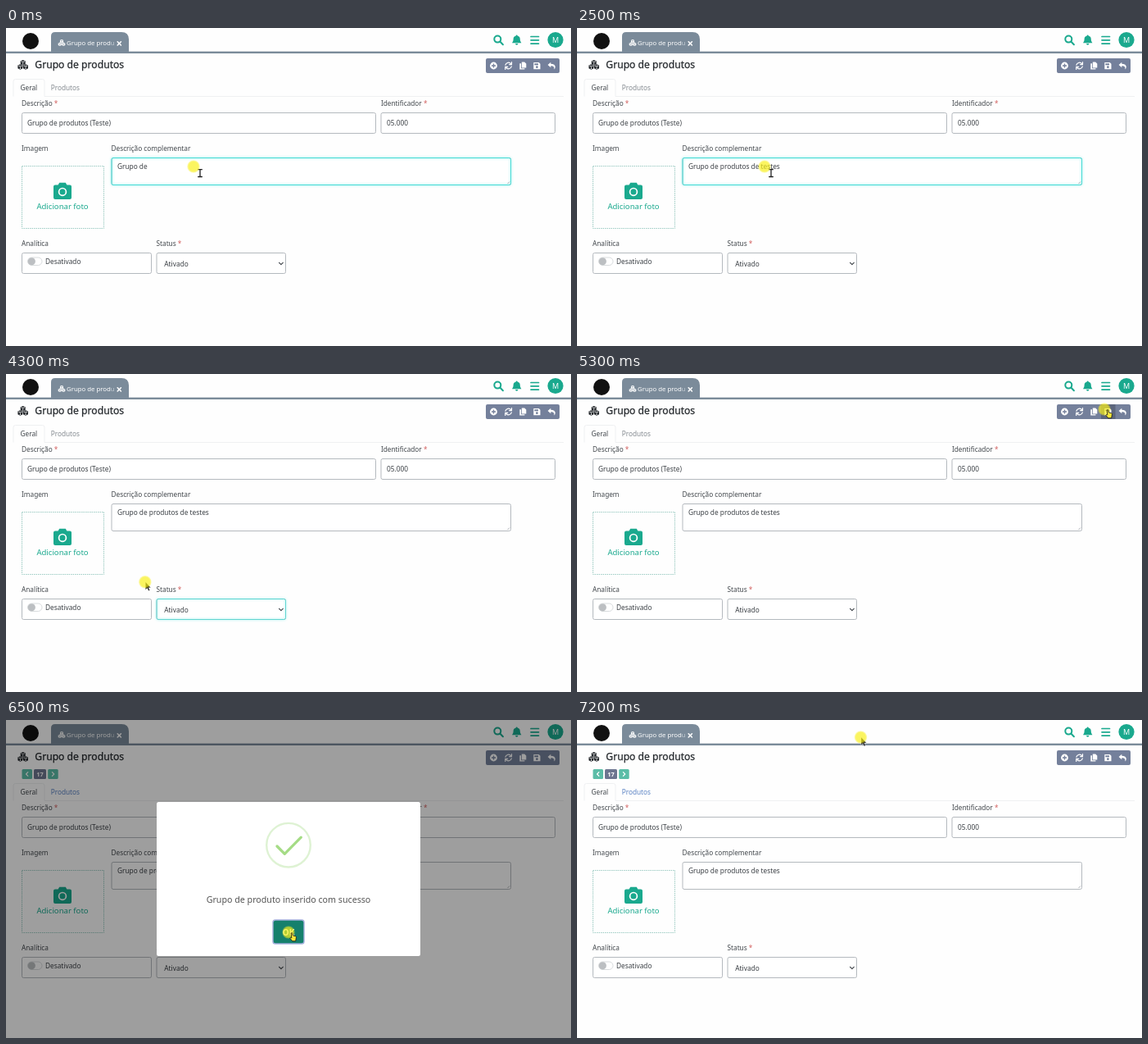
An HTML page for the animation above (7.3 s loop, 690 by 388 pixels).

```html
<!DOCTYPE html>
<html lang="pt">
<head>
<meta charset="utf-8">
<title>Grupo de produtos</title>
<style>
  html, body { margin: 0; width: 100%; height: 100%; overflow: hidden; background: #fefefe; }
  svg { display: block; width: 690px; height: 388px; font: 8.25px "Noto Sans", "Open Sans", sans-serif; }
  text { fill: #43484d; white-space: pre; }
  .value { fill: #3c4146; font-size: 8.3px; }
  .star { fill: #d2605f; }
  .box { fill: #fff; stroke: #b4b9be; }
  .focus { fill: none; stroke: #4fdcd6; filter: drop-shadow(0 0 1.5px #5fe8e2); }
  .green { fill: #1aa98e; }
  .white { fill: #fff; }
  .line { fill: none; stroke: currentColor; stroke-linecap: round; stroke-linejoin: round; }
  .bold { font-weight: 700; text-anchor: middle; fill: #fff; }
  .heading { font-size: 12.15px; fill: #25292d; stroke: #25292d; stroke-width: .25; }
</style>
</head>
<body>
<svg viewBox="0 0 690 388">
  <defs>
    <g id="cube">
      <path d="M0-3.3 3-2V1.7L0 3.2-3 1.7V-2Z" fill="currentColor"/>
      <path d="M-2.1-1.6 0-.7 2.1-1.6M0 .3V2.4" fill="none" stroke="var(--cut)" stroke-width=".9"/>
    </g>
    <g id="cubes">
      <use href="#cube" y="-2.6"/><use href="#cube" x="-3.3" y="2.7"/><use href="#cube" x="3.3" y="2.7"/>
    </g>
    <radialGradient id="spot">
      <stop offset=".75" stop-color="#f9f01c" stop-opacity=".7"/>
      <stop offset="1" stop-color="#f9f01c" stop-opacity=".25"/>
    </radialGradient>
  </defs>

  <!-- Header -->
  <circle cx="30" cy="16" r="10" fill="#111"/>
  <path d="M55 30V10Q55 5 60 5H141Q150 5 150 14V30Z" fill="#7b8b9a"/>
  <rect y="28.6" width="690" height="2.4" fill="#7b8b9a"/>
  <use href="#cubes" transform="translate(68 18) scale(.68)" style="color:#fff;--cut:#7b8b9a"/>
  <text x="74" y="20.8" font-size="7.8" class="white">Grupo de prod<tspan opacity=".55">u</tspan></text>
  <path class="line" d="m136.2 16.8 4.2 4.2m0-4.2-4.2 4.2" color="#fff" stroke-width="1.6"/>
  <g class="line" color="#1aa98e" stroke-width="2">
    <circle cx="600.3" cy="13.6" r="4"/><path d="m603.5 16.8 3.4 3.4"/>
    <path d="M641 10.5h9.5M641 14.8h9.5M641 19.1h9.5" stroke-width="1.7"/>
  </g>
  <path class="green" d="M623.7 8.4Q624.7 8.4 624.7 9.6C627 10.2 627.8 11.8 627.8 14Q627.8 16.6 629.4 18.2H618Q619.6 16.6 619.6 14C619.6 11.8 620.4 10.2 622.7 9.6Q622.7 8.4 623.7 8.4ZM622 19H625.4Q625.2 20.7 623.7 20.7T622 19Z"/>
  <circle class="green" cx="671" cy="14.5" r="9.6"/>
  <text x="671" y="17.9" font-size="9" text-anchor="middle" class="white">M</text>

  <!-- Page -->
  <g id="page">
    <use href="#cubes" transform="translate(20.7 44.9)" style="color:#25292d;--cut:#fff"/>
    <text x="35.3" y="49.4" class="heading">Grupo de produtos</text>
    <g id="pager">
      <rect x="19.5" y="60" width="12.5" height="12" rx="1.5" fill="#5bbda7"/>
      <rect x="34" y="60" width="15" height="12" rx="1.5" fill="#6d7590"/>
      <rect x="51.2" y="60" width="12.5" height="12" rx="1.5" fill="#5bbda7"/>
      <path class="line" d="m26.8 63.7-2.3 2.3 2.3 2.3M56.4 63.7l2.3 2.3-2.3 2.3" color="#fff" stroke-width="1.2"/>
      <text x="41.5" y="68.7" font-size="7.3" class="bold">17</text>
    </g>
    <g id="form">
      <path d="M9 83.5V65Q9 62.5 11.5 62.5H44.5Q47 62.5 47 65V83.5H681" fill="none" stroke="#eff0f2"/>
      <text x="17.5" y="76">Geral</text>
      <text x="54.7" y="76" id="products">Produtos</text>

      <text x="19" y="94.8">Descrição <tspan class="star">*</tspan></text>
      <rect class="box" x="19.5" y="103.5" width="432" height="25" rx="2"/>
      <text x="26" y="119" class="value">Grupo de produtos (Teste)</text>
      <text x="458" y="94.8">Identificador <tspan class="star">*</tspan></text>
      <rect class="box" x="458" y="103.5" width="212.5" height="25" rx="2"/>
      <text x="465" y="119" class="value">05.000</text>

      <text x="19" y="149.8">Imagem</text>
      <rect x="19.5" y="168.5" width="100" height="76" fill="none" stroke="#86bfb5" stroke-width=".8" stroke-dasharray="1.5 1"/>
      <path class="green" d="M60 191.5H63.6L65.2 188.8H72.8L74.4 191.5H78Q80 191.5 80 193.5V207Q80 209 78 209H60Q58 209 58 207V193.5Q58 191.5 60 191.5Z"/>
      <circle cx="69" cy="199.9" r="4.4" fill="none" stroke="#fff" stroke-width="1.7"/>
      <text x="69" y="221" font-size="9.55" text-anchor="middle" class="green">Adicionar foto</text>

      <text x="128.5" y="149.8">Descrição complementar</text>
      <rect class="box" x="129" y="158.5" width="487.5" height="33" rx="2"/>
      <rect class="focus" id="areaFocus" x="129" y="158.5" width="487.5" height="33" rx="2"/>
      <path d="m612.5 190 2.5-2.5" stroke="#8a8f95" stroke-width=".7"/>
      <text x="136" y="171.8" class="value" id="typed"></text>
      <rect id="caret" y="163" width=".9" height="11" fill="#222"/>

      <text x="19" y="266">Analítica</text>
      <rect class="box" x="19.5" y="274.5" width="158" height="25" rx="2"/>
      <rect x="26.5" y="280" width="17.5" height="9.5" rx="4.75" fill="#fff" stroke="#cfd2d5" stroke-width=".8"/>
      <circle cx="31.3" cy="284.8" r="4.6" fill="#bcbfc2"/>
      <text x="48" y="288" class="value">Desativado</text>
      <text x="183.5" y="266">Status <tspan class="star">*</tspan></text>
      <rect class="box" x="184" y="274.5" width="157.5" height="25" rx="2"/>
      <rect class="focus" id="selectFocus" x="184" y="274.5" width="157.5" height="25" rx="2"/>
      <text x="193.3" y="290.6" class="value">Ativado</text>
      <path class="line" d="m333.6 286.3 2.3 2.4 2.3-2.4" color="#43484d" stroke-width="1.2"/>
    </g>
    <g id="toolbar">
      <rect x="586" y="37" width="90" height="18" rx="2" fill="#74809b"/>
      <rect id="saveHover" x="640" y="37" width="17.5" height="18" fill="#5c667d"/>
      <circle class="white" cx="595.5" cy="46" r="4.4"/>
      <path d="M593 46h5M595.5 43.5v5" stroke="#74809b" stroke-width="1.3"/>
      <path class="line" d="M609.9 45.2A3.8 3.8 0 0 1 616.7 43.8M617.3 46.8A3.8 3.8 0 0 1 610.5 48.2M617.5 41.6V44.6H614.6M609.7 50.4V47.4H612.6" color="#fff" stroke-width="1.2"/>
      <path class="white" d="M629.8 41.5H633.2L635.3 43.6V48.5H629.8ZM627.3 43.3H629V49.3H633.4V50.6H627.3Z"/>
      <path class="white" fill-rule="evenodd" d="M644.3 42H650.7L652.5 43.8V50.2H644.3ZM645.4 43.2V45.2H650V43.2ZM648.4 46.3A1.4 1.4 0 1 0 648.4 49.1 1.4 1.4 0 1 0 648.4 46.3Z"/>
      <path class="white" d="M661.6 45 665.3 41.8V43.7C669 43.7 670.8 45.3 670.8 47.6Q670.8 49.4 669.3 50.5C669.9 47.6 668.6 46.4 665.3 46.3V48.3Z"/>
    </g>
  </g>

  <g id="dropdown">
    <rect x="184" y="300" width="157.5" height="25" fill="#fff" style="filter:drop-shadow(0 4px 6px #0004)"/>
    <rect x="184" y="312.4" width="157.5" height="12.4" fill="#1a63c5"/>
    <text x="193.3" y="309.8" class="value">Desativado</text>
    <text x="193.3" y="321.9" class="value" style="fill:#fff">Ativado</text>
  </g>

  <rect id="backdrop" width="690" height="388"/>
  <g id="dialog">
    <rect x="184" y="100" width="322" height="188" rx="2.5" fill="#fff"/>
    <circle cx="345" cy="152.7" r="26.8" fill="none" stroke="#a5dc86" stroke-opacity=".36" stroke-width="2.4"/>
    <path id="tick" class="line" d="m331 154 9.3 9.3L360.3 143.2" color="#a5dc86" stroke-width="3.3" pathLength="1" stroke-dasharray="1 2"/>
    <text x="345" y="222.8" font-size="10.68" text-anchor="middle" style="fill:#545454">Grupo de produto inserido com sucesso</text>
    <rect id="okRing" x="325.3" y="243.3" width="39.4" height="30.4" rx="3.5" fill="#a3aedb"/>
    <rect id="okButton" x="326.7" y="244.7" width="36.6" height="27.6" rx="2.5"/>
    <text x="345" y="262.5" font-size="9.9" class="bold">OK</text>
  </g>

  <g id="statusBar">
    <rect y="380" width="229.5" height="8" fill="#1d1f21"/>
    <text x="1.5" y="385.7" font-size="3.7" class="white">Aguardando dev.gestao.plus...</text>
  </g>

  <g id="pointer">
    <path id="beam" class="line" d="M5.7 3.7H10.3M8 3.7V12.5M5.7 12.5H10.3" color="#222" stroke-width="1.3"/>
    <path id="arrow" d="M.5 0V9.6L2.7 7.6 4.2 10.9 5.8 10.2 4.3 7H7Z" fill="#111" stroke="#fff" stroke-width=".4"/>
    <circle r="7.8" fill="url(#spot)"/>
    <path id="hand" d="M3.2 1Q4.6 0 5 1.5L5.5 4 8.6 4.8Q9.6 5.2 9.4 6.6L8.7 10.8H4.8L1.9 7.5Q1.6 6.2 3.8 6.8Z" fill="#f6e83a" stroke="#111" stroke-width=".8"/>
  </g>
</svg>
<script>
  const LOOP = 7300, STEP = 100;
  const TYPED = 'produtos de testes';
  const PATH = [
    [0, 229, 169], [2900, 229, 169], [3200, 285, 287], [3900, 285, 287],
    [4200, 140, 262], [4500, 255, 230], [5100, 644, 43], [5500, 644, 43],
    [5900, 441.5, 173.5], [6200, 345, 259], [6600, 345, 259],
    [6900, 342, 6], [7100, 346.5, 21], [LOOP, 346.5, 21]
  ];

  const el = id => document.getElementById(id);
  const show = (id, visible) => el(id).style.display = visible ? '' : 'none';
  const set = (id, name, value) => el(id).setAttribute(name, value);
  const ramp = (t, from, to) => Math.min(1, Math.max(0, (t - from) / (to - from)));
  const ease = p => p * p * (3 - 2 * p);

  function pointerAt(t) {
    const i = PATH.findIndex(([end]) => end > t);
    const [t0, x0, y0] = PATH[i - 1], [t1, x1, y1] = PATH[i];
    const p = ease(ramp(t, t0, t1));
    return [x0 + (x1 - x0) * p, y0 + (y1 - y0) * p];
  }

  function typedCount(t) {
    if (t >= 2100) return 18;
    if (t >= 1700) return 17;
    return Math.min(16, Math.max(0, Math.floor((t / 100 - 4) * 1.5)));
  }

  function drawForm(t) {
    const saved = t >= 6100;
    el('typed').textContent = 'Grupo de ' + TYPED.slice(0, typedCount(t));
    set('caret', 'x', 136 + el('typed').getComputedTextLength());
    show('caret', t >= 300 && t < 2500 || t >= 2800 && t < 3100);
    set('areaFocus', 'opacity', 1 - ramp(t, 3200, 3600));
    set('selectFocus', 'opacity', 0.8 * (ramp(t, 3200, 3600) - ramp(t, 4900, 5200)));
    set('form', 'transform', `translate(0 ${saved ? 15 : 0})`);
    set('page', 'opacity', t >= 5400 && !saved ? 0.5 : 1);
    el('products').style.fill = saved ? '#5b83c4' : '#858b91';
    show('pager', saved);
    show('dropdown', t >= 3300 && t < 3700);
    show('saveHover', t >= 5100 && t < 5600);
    show('statusBar', t >= 5700 && t < 6100);
  }

  function drawDialog(t) {
    const enter = ramp(t, 5500, 5800), leave = ramp(t, 6600, 6800);
    const scale = (0.7 + 0.3 * ease(enter)) * (1 - 0.5 * leave);
    const dim = 0.18 * enter + 0.2 * ramp(t, 5900, 6100);
    set('backdrop', 'opacity', dim * (1 - ramp(t, 6600, 6900)));
    set('dialog', 'opacity', enter * (1 - leave));
    set('dialog', 'transform', `translate(345 194) scale(${scale}) translate(-345 -194)`);
    show('tick', t > 5900);
    set('tick', 'stroke-dashoffset', 1 - ramp(t, 5900, 6300));
    set('okButton', 'fill', t >= 6200 ? '#15806c' : '#1eaa90');
    show('okRing', t >= 6400);
  }

  function drawPointer(t) {
    const [x, y] = pointerAt(t);
    const onToolbar = x > 586 && y > 37 && y < 55;
    const onButton = t >= 6100 && t < 6700 && y > 245 && y < 272;
    const hand = onToolbar || onButton;
    set('pointer', 'transform', `translate(${x} ${y})`);
    show('beam', t < 3000);
    show('hand', hand);
    show('arrow', t >= 3000 && !hand);
  }

  function frame(now) {
    const t = Math.floor(now % LOOP / STEP) * STEP;
    drawForm(t);
    drawDialog(t);
    drawPointer(t);
    requestAnimationFrame(frame);
  }
  frame(performance.now());
</script>
</body>
</html>
```
